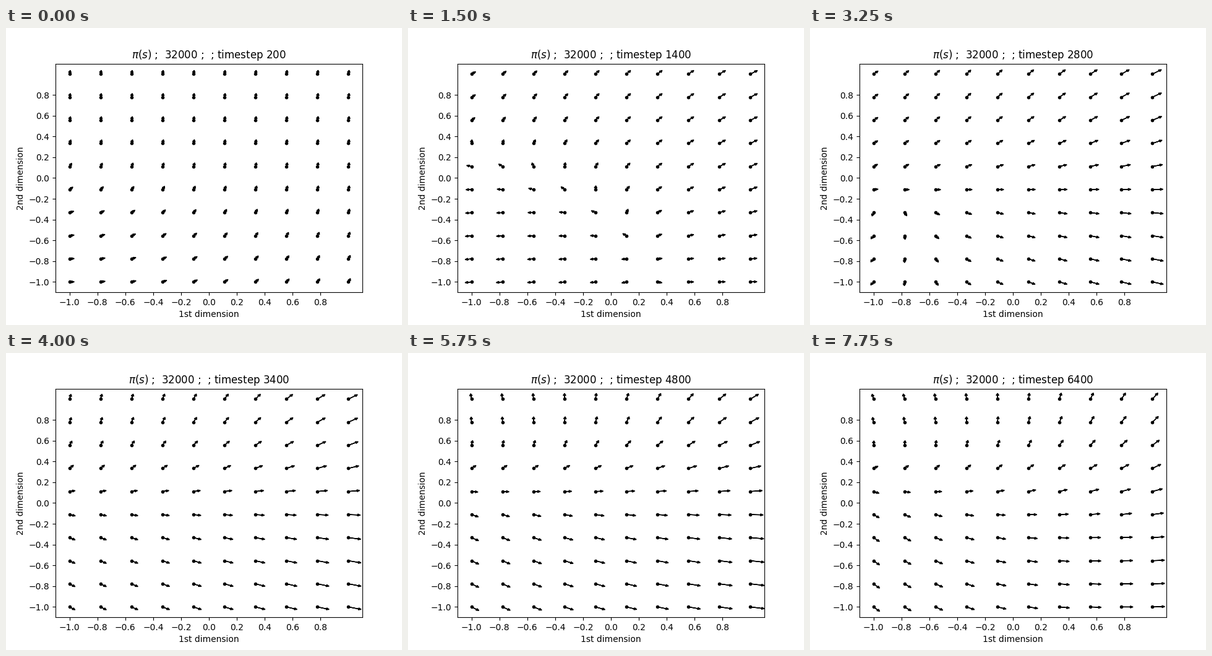
A matplotlib script for the animation above (8000 ms loop, 640x480 px).

```python
import numpy as np
import matplotlib.pyplot as plt
from matplotlib.animation import FuncAnimation

N = 10
FRAMES = 32
STEP = 200
INTERVAL = 250
HEAD = 0.02
SHORTEST = 0.013

# Corner flows (right, up) in thousandths, at these time steps
KEYS = [200, 1000, 2000, 2800, 4000, 6400]
LOW_LEFT = [(2, 0), (-18, -1), (-8, -4), (-2, -3), (29, -16), (21, -20)]
LOW_RIGHT = [(1.2, 2.5), (6, 4), (25, -6), (47, -14), (73, -18), (56, 2)]
TOP_LEFT = [(0.5, 3), (4, 2.5), (5, 4), (9, 8), (-3, 22), (-4, 17)]
TOP_RIGHT = [(0.5, 4), (15, 13), (35, 20), (37, 25), (37, 26), (19, 32)]

axis = np.linspace(-1, 1, N)
xs, ys = np.meshgrid(axis, axis)


def at(track, step):
    """Position along a track of key points."""
    return [np.interp(step, KEYS, part) / 1000 for part in zip(*track)]


def band(left, right, step, power):
    """Flow across the columns: u bends with the given power, v is linear."""
    s = (xs + 1) / 2
    (u0, v0), (u1, v1) = at(left, step), at(right, step)
    return np.array([u0 + (u1 - u0) * s**power, v0 + (v1 - v0) * s])


def policy(step):
    """A lower and an upper flow, joined at a soft front that rises and levels."""
    p = min((step - 200) / 3800, 1)
    front = 0.45 * p - 0.25 - 0.2 * xs * (1 - p)
    mix = 0.5 + 0.5 * np.tanh(2 * (ys - front))
    flow = ((1 - mix) * band(LOW_LEFT, LOW_RIGHT, step, 1.5)
            + mix * band(TOP_LEFT, TOP_RIGHT, step, 2.5))
    size = np.maximum(np.hypot(*flow), 1e-9)
    return flow * (1 + SHORTEST / size)


fig, ax = plt.subplots(figsize=(6.4, 4.8), dpi=100)
ticks = np.round(np.arange(-1, 1, 0.2), 1)
ax.set(xlim=(-1.1, 1.1), ylim=(-1.1, 1.1), xticks=ticks, yticks=ticks,
       xlabel="1st dimension", ylabel="2nd dimension")
ax.plot(xs.ravel(), ys.ravel(), "k.")
title = ax.set_title("")
arrows = []


def draw(i):
    step = STEP * (i + 1)
    title.set_text(rf"$\pi(s)$ ;  32000 ;  ; timestep {step}")
    while arrows:
        arrows.pop().remove()
    u, v = policy(step)
    for x, y, dx, dy in zip(xs.flat, ys.flat, u.flat, v.flat):
        arrows.append(ax.arrow(x, y, dx, dy, head_width=HEAD,
                               head_length=HEAD, fc="k", ec="k"))
    return [title, *arrows]


anim = FuncAnimation(fig, draw, frames=FRAMES, interval=INTERVAL,
                     init_func=lambda: draw(0), repeat=True, repeat_delay=0)
plt.show()
```
